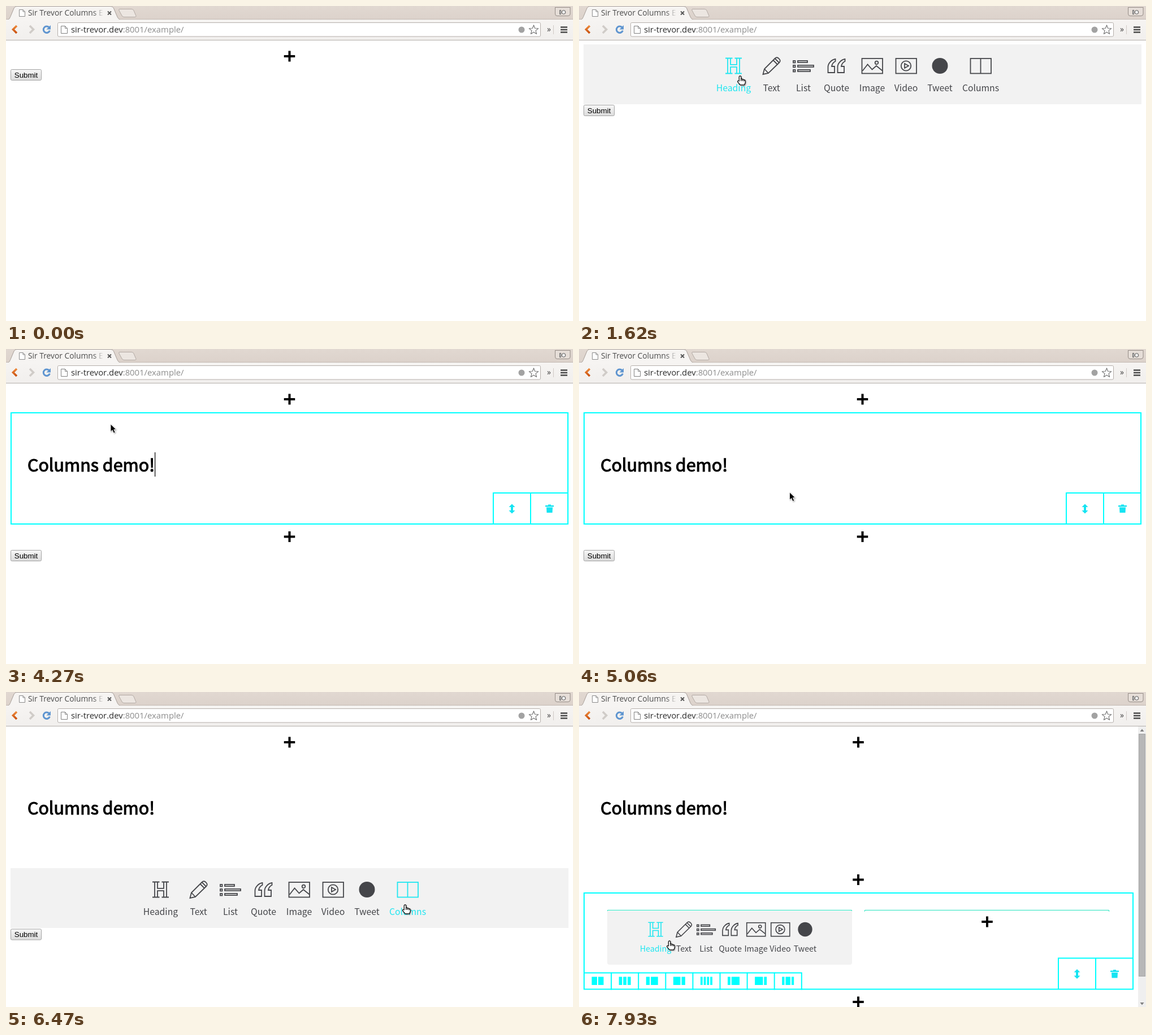
An HTML page for the animation above (8 s loop, 1003x558 px).

```html
<!DOCTYPE html>
<html lang="en">
<head>
<meta charset="utf-8">
<title>Columns demo</title>
<style>
html, body { margin: 0; width: 100%; height: 100%; overflow: hidden; background: #fff; }
svg { display: block; position: absolute; left: 0; top: 0; }
text { white-space: pre; }
.ui { font-family: "Open Sans", "Noto Sans", sans-serif; }
.page { font-family: "Noto Sans CJK JP", "Noto Sans CJK SC", "Noto Sans CJK", "Open Sans", sans-serif; }
.button { font: 13.33px "Liberation Sans", Arial, sans-serif; text-anchor: middle; }
.title { font-size: 30.45px; stroke: #000; stroke-width: 1.1; }
.label { text-anchor: middle; fill: currentColor; }
.item { color: #45464a; }
.item path, .item rect, .item circle { fill: none; stroke: currentColor; stroke-width: 1.8; }
.item .dot { fill: currentColor; stroke: none; }
.item.on { color: #1fe6f0; }
.add .bg { fill: #f2f2f2; visibility: hidden; }
.add path { stroke: #000; stroke-width: 4; }
.add.on .bg { visibility: visible; }
.add.on path { stroke: #1fe0ea; }
.frame { fill: none; stroke: #0ff; stroke-width: 2; }
.tool { fill: #16e4f2; }
.block .border { visibility: hidden; }
.block.on .border { visibility: visible; }
</style>
</head>
<body>
<svg id="stage" width="1003" height="558" viewBox="0 0 1003 558">
  <defs>
    <linearGradient id="fade" gradientUnits="userSpaceOnUse" x1="154" x2="173">
      <stop offset="0" stop-color="#4a4a4a"/><stop offset="1" stop-color="#4a4a4a" stop-opacity="0"/>
    </linearGradient>
    <linearGradient id="bar" x2="0" y2="1"><stop stop-color="#e1d8d1"/><stop offset="1" stop-color="#dcd2cb"/></linearGradient>
    <linearGradient id="tools" x2="0" y2="1"><stop stop-color="#f6f4f2"/><stop offset="1" stop-color="#f1efed"/></linearGradient>
    <linearGradient id="push" x2="0" y2="1"><stop stop-color="#f7f7f7"/><stop offset="1" stop-color="#dcdcdc"/></linearGradient>
    <linearGradient id="flame" x2="0" y2="1"><stop stop-color="#ee8a3c"/><stop offset="1" stop-color="#c9500f"/></linearGradient>
  </defs>

  <g id="page" class="page"></g>

  <g id="browser" class="ui">
    <rect width="1003" height="24" fill="url(#bar)"/>
    <rect y="24" width="1003" height="36" fill="url(#tools)"/>
    <path d="M0 23.5H1003" stroke="#c3b9b2"/>
    <path d="M0 60.5H1003" stroke="#b3aeaa"/>
    <path d="M2 24.5C6 24 7 21 9 16L14 4Q15.5.5 19 .5H185Q189 .5 190.5 4L196 17Q198.5 24 203 24.5Z" fill="#f6f4f2" stroke="#a79e98"/>
    <rect x="1" y="24" width="204" height="2" fill="#f6f4f2"/>
    <path d="M201 5.500H222Q225 5.500 226 8L230 17.500Q230.500 19.500 228 19.500H209Q206 19.500 205 17L200 8Q199 5.500 201 5.500Z" fill="#ece6e1" stroke="#b3aaa4"/>
    <path d="M23.500 6.500H30L33.500 10V18.500H23.500ZM30 6.500V10H33.500" fill="#fff" stroke="#8b8b8b"/>
    <text x="39" y="17" font-size="13.8" fill="url(#fade)">Sir Trevor Columns E</text>
    <path d="M180 9.500L186 15.500M186 9.500L180 15.500" stroke="#555" stroke-width="1.900"/>
    <path d="M971.500 2V14Q971.500 17.500 975 17.500H994Q998 17.500 998 14V2" fill="#e6ded8" stroke="#948b85"/>
    <path d="M971.500 2.500H998" stroke="#948b85"/>
    <g fill="#eee" stroke="#555"><path d="M979.500 7.500H981.500V14.500H979.500Z"/><circle cx="986.500" cy="11" r="3.300"/></g>

    <path d="M19 35L12.500 41.500L19 48" fill="none" stroke="url(#flame)" stroke-width="3.600"/>
    <path d="M42 35L48.500 41.500L42 48" fill="none" stroke="#d0ccc8" stroke-width="3.600"/>
    <path d="M76.500 38.200A5.700 5.700 0 1 0 77.400 43.500" fill="none" stroke="#5f95d0" stroke-width="3"/>
    <path d="M79 34V41.500H71.500Z" fill="#5f95d0"/>
    <rect x="91.500" y="29.500" width="854" height="24.500" rx="2" fill="#fff" stroke="#b4aeaa"/>
    <path d="M97.500 35.500H104.500L108.500 39.500V48.500H97.500ZM104.500 35.500V39.500H108.500" fill="#fff" stroke="#808080"/>
    <text x="115" y="47" font-size="14.85" fill="#2b2b2b">sir-trevor.dev<tspan fill="#8c8c8c">:8001/example/</tspan></text>
    <circle cx="912" cy="42" r="5.500" fill="#a2a2a2"/>
    <path id="star" fill="#fff" stroke="#777" stroke-width="1.200" stroke-linejoin="round"/>
    <text x="957" y="46" font-size="14" fill="#3c3c3c">»</text>
    <path d="M968.500 34V50" stroke="#cfc9c5"/>
    <path d="M981 37.500H993M981 42H993M981 46.500H993" stroke="#4a4a4a" stroke-width="2.600"/>
  </g>

  <g id="cursor" style="filter:drop-shadow(1.500px 1.500px 1px rgba(0,0,0,.35))">
    <path id="arrow" d="M0 0V13.500L3.200 10.700L5.500 16L8.200 14.900L5.900 9.700H10Z" fill="#000" stroke="#fff" stroke-width=".9"/>
    <path id="hand" d="M-1.700 1Q0-1.200 1.700 1V5.500Q3.300 4.600 4.300 6Q6 5.300 6.900 7Q9 6.600 9.300 8.700V11.500L7.700 15.800H.3L-4.500 10.200Q-4.600 7.300-1.700 9ZM1.700 5.500V9M4.300 6V9M6.900 7V9.500" fill="#fff" stroke="#000" stroke-width="1.200" stroke-linejoin="round"/>
  </g>
</svg>
<script>
(() => {
const $ = id => document.getElementById(id);
const LOOP = 8000;

const bars = [[-10, 17], [-10, 28], [-10, 22]];
const quote = 'M-2-12C-9-11-15-4-15 2V12H-3.500V1H-8.500C-8-3-6-6-2-8Z';
const icons = {
  Heading: '<path d="M-14.500-13.500H-2M2-13.500H14.500M-14.500 13.500H-2M2 13.500H14.500M-10.500-13V13M-5.500-13V-2.200H5.500V-13M10.500-13V13M-5.500 13V2.200H5.500V13"/>',
  Text: '<path d="M-15 15L-12.500 5.500L6-13Q9.500-16.500 13.300-12.700T13.500-5.500L-5.500 13ZM3-10L10.500-2.500M6-13L13.500-5.500M-12.500 5.500L-5.500 13"/>',
  List: bars.map(([x, w], i) => {
    const y = i * 8 - 9;
    return `<rect x="-18" y="${y}" width="3.500" height="3.500"/><rect x="${x}" y="${y}" width="${w}" height="3"/>`;
  }).join(''),
  Quote: `<path d="${quote}"/><path transform="translate(17)" d="${quote}"/>`,
  Image: '<rect x="-18" y="-13" width="36.500" height="26.500"/><path d="M-17 9L-8-2.500L0 6.500L7.500 0L18 8.500"/><circle cx="8" cy="-5.500" r="2.800"/>',
  Video: '<rect x="-18" y="-13" width="36.500" height="26.500"/><circle r="8.700"/><path d="M-2.500-4L4.500 0L-2.500 4Z"/>',
  Tweet: '<circle class="dot" r="14"/>',
  Columns: '<rect x="-18" y="-13" width="36.500" height="26.500"/><path d="M0-13V13"/>'
};

// name, centre in the wide panel, half width, centre in the narrow panel
const items = [
  ['Heading', 273.5, 30.5, 135.5], ['Text', 340.5, 16, 185.5], ['List', 397, 19, 225],
  ['Quote', 455.5, 23, 267.5], ['Image', 518.5, 23, 313], ['Video', 578.5, 21, 356],
  ['Tweet', 638.5, 22.5, 400], ['Columns', 710.5, 32]
];

const box = (x, y, w, h) => `data-box="${x} ${y} ${w} ${h}"`;

const submit = y => `<rect x="8.500" y="${y + .5}" width="54" height="19" rx="2" fill="url(#push)" stroke="#a3a3a3"/>
  <text class="button" x="35.500" y="${y + 14.5}">Submit</text>`;

const add = (cx, cy, x = 8, w = 987) => `<g class="add hot" ${box(x, cy - 20, w, 43)}>
  <rect class="bg" x="${x}" y="${cy - 20}" width="${w}" height="42" rx="5"/>
  <path d="M${cx - 9.75} ${cy}h19.500M${cx} ${cy - 9.5}v19"/></g>`;

const item = (name, cx, cy, half, scale, drop) => `<g class="item hot" data-hand="1" ${box(cx - half, cy - 18, half * 2, drop + 24)}>
  <g transform="translate(${cx} ${cy}) scale(${scale})">${icons[name]}</g>
  <text class="label" x="${cx}" y="${cy + drop}" font-size="${15.76 * scale}">${name}</text></g>`;

const panel = y => `<rect x="8" y="${y}" width="987" height="106" fill="#f2f2f2"/>` +
  items.map(([n, cx, half]) => item(n, cx, y + 38, half, 1, 45)).join('');

const narrowPanel = () => '<path d="M50 388H483V479Q483 483 479 483H54Q50 483 50 479Z" fill="#f2f2f2"/>' +
  items.filter(i => i[3]).map(([n, , half, cx]) => item(n, cx, 420.5, half * .9, .905, 39.5)).join('');

const border = (y0, y1, right) => {
  const y = y1 - 56, x = right - 134, cy = y1 - 28;
  return `<path class="frame" d="M9 ${y0 + 1}H${right - 1}V${y1 - 1}H9ZM${x + 1} ${y1}V${y}H${right}M${x + 67} ${y}V${y1}"/>
    <path class="tool" transform="translate(${x + 34} ${cy})" d="M0-8.500L5.500-3H2V3H5.500L0 8.500L-5.500 3H-2V-3H-5.500Z"/>
    <path class="tool" transform="translate(${x + 100.5} ${cy})" d="M-2.500-7.500H2.500V-6H7.500V-3.500H-7.500V-6H-2.500ZM-5.500-2.500H5.500L5 7H-5Z"/>`;
};

const layouts = [[1, 1], [1, 1, 1], [1, 2], [2, 1], [1, 1, 1, 1], [1, 3], [3, 1], [1, 2, 1]];
const layoutBar = bottom => layouts.map((cols, i) => {
  const left = 9 + i * 48.1, y = bottom - 31;
  const unit = (21 - 2 * (cols.length - 1)) / cols.reduce((a, b) => a + b);
  let x = left + 13.5;
  const parts = cols.map(c => {
    const r = `<rect x="${x}" y="${bottom - 23}" width="${c * unit}" height="14.500" fill="#0ff"/>`;
    x += c * unit + 2;
    return r;
  });
  return `<path class="frame" d="M${left} ${y + 1}h48.100V${bottom}"/>` + parts.join('');
}).join('');

const rail = (x, w) => `<path d="M${x + .5} 389V386.500H${x + w - .5}V389" fill="none" stroke="#22e3bd"/>`;
const columns = (bottom, right, w, x2) => border(355, bottom, right) + layoutBar(bottom) + rail(50, w) + rail(x2, w);

const title = (attrs = '') => `<text class="title" x="38" y="216.500" ${attrs}>Columns demo!</text>`;
const firstAdd = add(501.5, 89);
const scrollbar = `<rect x="989" y="61" width="14" height="497" fill="#efefef"/>
  <rect x="990.500" y="74.500" width="11" height="429" fill="#b7b7b7" stroke="#a4a4a4"/>
  <path d="M992.500 70L996 65.500L999.500 70ZM992.500 550L996 554.500L999.500 550Z" fill="#808080"/>`;

// start time, content
const scenes = [
  [0, firstAdd + submit(112)],
  [910, panel(68) + submit(175)],
  [1840, firstAdd + `<g class="block hot" ${box(8, 112, 987, 199)}><g class="border">${border(112, 311, 995)}</g></g>` +
    title('id="typed"') + '<rect id="caret" y="183" width="1.200" height="43"/>' + add(501.5, 332.5) + submit(356)],
  [5410, firstAdd + title() + panel(312) + submit(419.5)],
  [6630, firstAdd + title() + add(501.5, 332.5) + columns(473.5, 995, 440, 513) +
    add(270, 407, 50, 440) + add(732.5, 407, 513, 440) + add(501.5, 495.5) + submit(518.5)],
  [7400, add(494, 89, 8, 973) + title() + add(494, 332.5, 8, 973) + columns(527.5, 981, 433, 505) +
    narrowPanel() + add(722, 407, 505, 433) + add(494, 549, 8, 973) + scrollbar]
];

$('page').innerHTML = scenes.map(s => `<g>${s[1]}</g>`).join('');
const groups = [...$('page').children];
const hot = groups.map(g => [...g.querySelectorAll('.hot')].map(el => ({ el, area: el.dataset.box.split(' ').map(Number) })));

$('star').setAttribute('d', 'M' + Array.from({ length: 10 }, (_, i) => {
  const a = i * Math.PI / 5 - Math.PI / 2, r = i % 2 ? 3.7 : 8.6;
  return `${(933.5 + r * Math.cos(a)).toFixed(2)} ${(42.5 + r * Math.sin(a)).toFixed(2)}`;
}).join('L') + 'Z');

// pointer stops: time, x, y
const stops = [
  [50, 537, 335], [330, 487, 92], [440, 493, 66], [590, 493, 66], [740, 497, 80], [910, 497, 80],
  [1620, 285, 124], [1840, 285, 124], [2260, 185, 133], [4610, 185, 133], [5410, 500, 336],
  [5700, 305, 367], [5790, 288, 371], [5880, 292, 373], [6220, 636, 376], [6470, 706, 377],
  [6630, 706, 377], [7350, 263, 391], [7450, 263, 393], [7930, 160, 441], [LOOP, 160, 441]
];
const keyTimes = [2470, 2620, 2820, 3020, 3220, 3360, 3430, 3500, 3880, 3950, 4010, 4080, 4270];

function pointer(t) {
  const i = Math.max(1, stops.findIndex(p => p[0] > t));
  const [a, b] = [stops[i - 1], stops[i]];
  const k = Math.max(0, (t - a[0]) / (b[0] - a[0])), e = k * k * (3 - 2 * k);
  return [a[1] + (b[1] - a[1]) * e, a[2] + (b[2] - a[2]) * e];
}

function typeTitle(t) {
  const count = keyTimes.filter(k => k <= t).length;
  const typed = $('typed');
  typed.textContent = 'Columns demo!'.slice(0, count);
  $('caret').setAttribute('x', 38 + (count ? typed.getComputedTextLength() : 0));
  const since = t - (count ? keyTimes[count - 1] : 1910);
  $('caret').style.display = Math.floor(since / 500) % 2 === 1 ? 'none' : '';
}

function draw(t) {
  const now = scenes.filter(s => s[0] <= t).length - 1;
  groups.forEach((g, i) => { g.style.display = i === now ? '' : 'none'; });
  const [x, y] = pointer(t), shown = t >= 50;
  let hand = false;
  for (const { el, area: [ax, ay, w, h] } of hot[now]) {
    const on = shown && x >= ax && x < ax + w && y >= ay && y < ay + h;
    el.classList.toggle('on', on);
    if (on && el.dataset.hand) hand = true;
  }
  if (now === 2) typeTitle(t);
  $('cursor').style.display = shown ? '' : 'none';
  $('cursor').setAttribute('transform', `translate(${x.toFixed(1)} ${y.toFixed(1)})`);
  $('arrow').style.display = hand ? 'none' : '';
  $('hand').style.display = hand ? '' : 'none';
}

const start = performance.now();
function tick() {
  draw((performance.now() - start) % LOOP);
  requestAnimationFrame(tick);
}
tick();
})();
</script>
</body>
</html>
```
